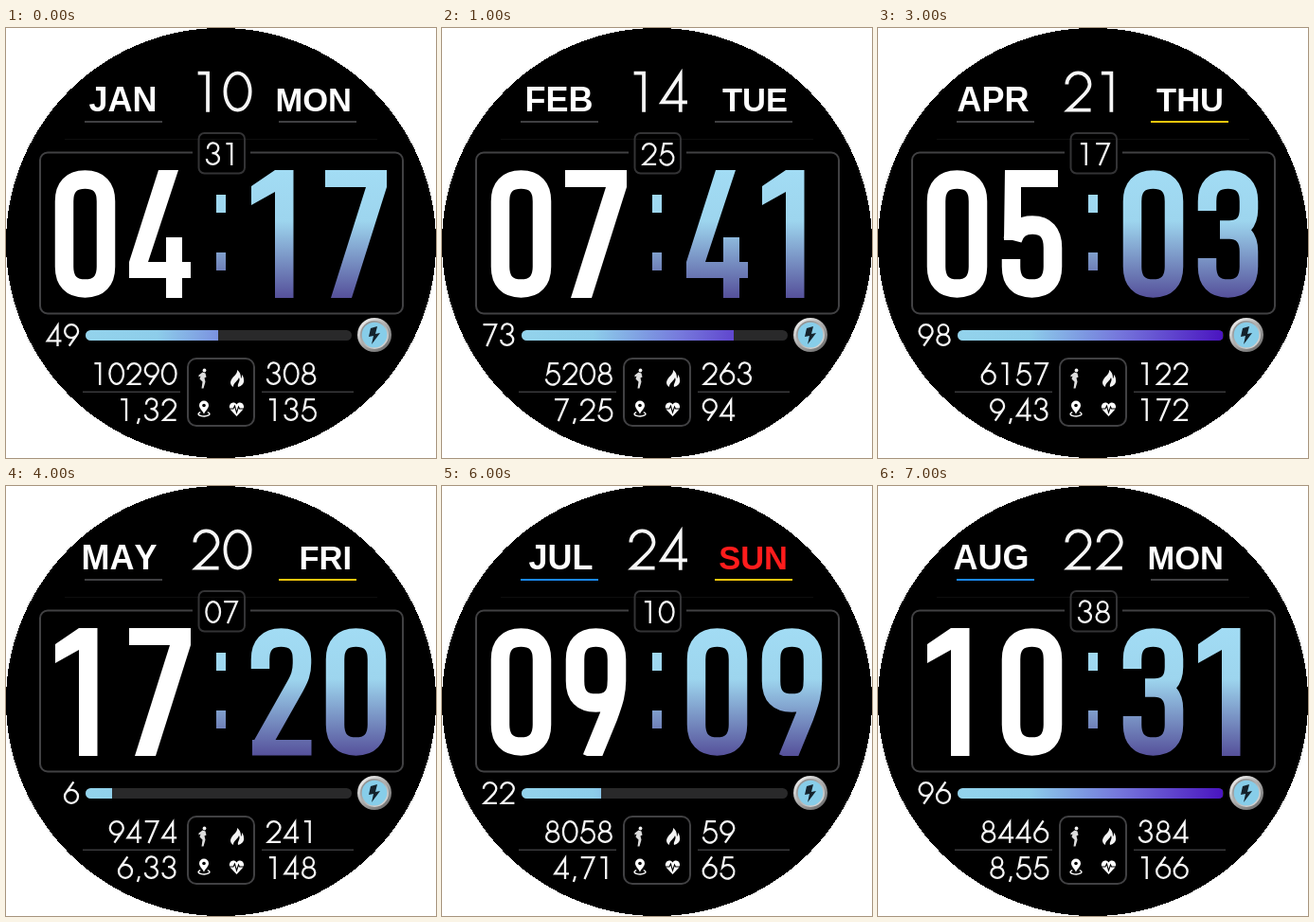
Write an HTML page with a canvas that moves like this. It is 454 by 454 pixels and loops after 8 s.

```html
<!DOCTYPE html>
<html>
<head>
<meta charset="utf-8">
<style>
  html, body { margin: 0; width: 100%; height: 100%; overflow: hidden; background: #fff; }
  canvas { display: block; }
</style>
</head>
<body>
<canvas id="face" width="454" height="454"></canvas>
<script>
const ctx = document.getElementById('face').getContext('2d');

// month, day, weekday, seconds, hours, minutes, battery, steps, distance, calories, pulse, month bar, weekday bar
const GRAY = '#404042', YELLOW = '#f5c60c', BLUE = '#1a88f0';
const states = [
  ['JAN', '10', 'MON', '31', '04', '17', 49, '10290', '1,32', '308', '135', GRAY, GRAY],
  ['FEB', '14', 'TUE', '25', '07', '41', 73, '5208', '7,25', '263', '94', GRAY, GRAY],
  ['MAR', '2', 'WED', '36', '14', '22', 51, '1966', '9,46', '182', '86', GRAY, YELLOW],
  ['APR', '21', 'THU', '17', '05', '03', 98, '6157', '9,43', '122', '172', GRAY, YELLOW],
  ['MAY', '20', 'FRI', '07', '17', '20', 6, '9474', '6,33', '241', '148', GRAY, YELLOW],
  ['JUN', '18', 'SAT', '42', '05', '40', 27, '7310', '5,28', '176', '102', GRAY, GRAY],
  ['JUL', '24', 'SUN', '10', '09', '09', 22, '8058', '4,71', '59', '65', BLUE, YELLOW],
  ['AUG', '22', 'MON', '38', '10', '31', 96, '8446', '8,55', '384', '166', BLUE, GRAY]
];

// Thin digits: centre lines in a cell 18.5 wide and 24 high.
const CELL = 18.5, COMMA = 9.2;
const thin = {
  0: 'M1.9 12A7.3 10.8 0 0 1 16.5 12A7.3 10.8 0 0 1 1.9 12Z',
  1: 'M4.4 1.2H10.2V24',
  2: 'M2.6 7.8A6.7 6.6 0 0 1 16 7.6C16 11.5 12 14.5 3.4 22.8H16.6',
  3: 'M3.6 6.6A5.6 5.4 0 1 1 9.2 11.2H8M9.2 11.2A6.5 5.8 0 1 1 2.4 17',
  4: 'M13.2 24V2L2.4 18.3H17.2',
  5: 'M15.6 1.2H6.2L4.2 11.4A7.1 7.2 0 1 1 2.3 17.4',
  6: 'M11.6 .4L3.5 12M2.2 15.8A7 7 0 0 1 16.2 15.8A7 7 0 0 1 2.2 15.8Z',
  7: 'M2.2 1.2H15.8L6 24',
  8: 'M4 6.4A5.2 5.2 0 0 1 14.4 6.4A5.2 5.2 0 0 1 4 6.4ZM2.6 17.2A6.6 5.6 0 0 1 15.8 17.2A6.6 5.6 0 0 1 2.6 17.2Z',
  9: 'M6.9 23.6L15 12M2.3 8.2A7 7 0 0 1 16.3 8.2A7 7 0 0 1 2.3 8.2Z',
  ',': 'M5.4 21L3.6 27'
};

// Heavy digits in a cell 65 wide and 135 high: [stroked path, filled path].
const TOP = 'V33C10.5 18 18 10 32.5 10S54.5 18 54.5 33';
const END = 'V102C54.5 117 47 125 32.5 125S10.5 117 10.5 102';
const heavy = {
  0: ['M10.5 102' + TOP + END + 'Z', ''],
  1: ['', 'M26 0H45.5V135H26V23L1 37V17Z'],
  2: ['M10.5 43' + TOP + 'V37C54.5 47 52 53 47 62L12 124', 'M2 118H64.5V134.5H2Z'],
  3: ['M10.5 43' + TOP + 'V41C54.5 56 47 63 34 63H24M34 63C47 63 54.5 71 54.5 86' + END + 'V93', ''],
  4: ['', 'M31 0H52L20 97H39V71H56V97H65V114H56V135H39V114H0V97Z'],
  5: ['M12 74C15 63 22 58 33 58C47 58 54.5 66 54.5 82' + END + 'V94', 'M4 0H60V18H21V74H3Z'],
  7: ['', 'M0 0H65V18L28 135H6L43 18H0Z'],
  9: ['M10.5 56' + TOP + 'V56C54.5 72 47 79 32.5 79S10.5 72 10.5 56ZM54.5 54C54.5 72 50 81 46 93L28 137', '']
};

function compile(glyphs, make) {
  for (const key in glyphs) glyphs[key] = make(glyphs[key]);
}
compile(thin, d => new Path2D(d));
compile(heavy, pair => pair.map(d => new Path2D(d)));

function gradient(x0, y0, x1, y1, ...stops) {
  const g = ctx.createLinearGradient(x0, y0, x1, y1);
  stops.forEach(([at, color]) => g.addColorStop(at, color));
  return g;
}

const advance = ch => ch === ',' ? COMMA : CELL;

function drawThin(text, x, top, align = 0, scale = 1, width = 2.3) {
  const total = [...text].reduce((sum, ch) => sum + advance(ch), 0);
  ctx.save();
  ctx.translate(x - total * scale * align, top);
  ctx.scale(scale, scale);
  ctx.strokeStyle = '#f6f6f6';
  ctx.lineWidth = width;
  for (const ch of text) {
    ctx.stroke(thin[ch]);
    ctx.translate(advance(ch), 0);
  }
  ctx.restore();
}

function drawHeavy(text, x, paint) {
  [...text].forEach((ch, i) => {
    ctx.save();
    ctx.translate(x + i * 79, 150);
    ctx.beginPath();
    ctx.rect(-1, 0, 68, 135);
    ctx.clip();
    ctx.fillStyle = ctx.strokeStyle = paint;
    ctx.lineWidth = 19.5;
    ctx.stroke(heavy[ch][0]);
    ctx.fill(heavy[ch][1]);
    ctx.restore();
  });
}

function rect(x, y, w, h, color) {
  ctx.fillStyle = color;
  ctx.fillRect(x, y, w, h);
}

function frame(x, y, w, h, r, color) {
  ctx.beginPath();
  ctx.roundRect(x, y, w, h, r);
  ctx.strokeStyle = color;
  ctx.lineWidth = 2;
  ctx.stroke();
}

function disc(x, y, r, paint) {
  ctx.beginPath();
  ctx.arc(x, y, r, 0, Math.PI * 2);
  ctx.fillStyle = paint;
  ctx.fill();
}

// Row by row, so the rim stays hard-edged.
function drawDial(r) {
  for (let y = 0; y < 2 * r; y++) {
    const half = Math.round(Math.sqrt(r * r - (y + .5 - r) ** 2));
    rect(r - half, y, 2 * half, 1, '#000');
  }
}

function shape(d, x, y, color) {
  ctx.save();
  ctx.translate(x, y);
  ctx.fillStyle = color;
  ctx.fill(new Path2D(d));
  ctx.restore();
}

function label(text, right, size, color) {
  ctx.font = `bold ${size}px "Liberation Sans", Arial, sans-serif`;
  ctx.fontKerning = 'none';
  ctx.textAlign = 'right';
  ctx.fillStyle = color;
  ctx.fillText(text, right, 88);
}

function drawIcons() {
  disc(209.5, 361.5, 1.9, '#eee');
  shape('M-1 -6L2 -5L3 -1L1 0L2 4L0 11H-2L-1 4L-4 1L-3 -2L-5 -1L-5 -3Z', 208.5, 369.5, '#ddd');
  shape('M0 -9C1 -4 -6 -2 -7 4C-7 6 -6 8 -4 9C-4 4 1 3 2 -1C4 3 0 5 1 9C5 8 8 5 7 1C7 -1 6 -3 5 -4C5 -2 5 -1 4 0C4 -4 3 -7 0 -9Z', 244, 370, '#f4f4f4');
  ctx.strokeStyle = '#fff';
  ctx.lineWidth = 1.4;
  ctx.beginPath();
  ctx.ellipse(209, 407.5, 6, 2.4, 0, -.9, Math.PI + .9);
  ctx.stroke();
  shape('M0 13C-2 9 -5 7 -5 4A5 5 0 0 1 5 4C5 7 2 9 0 13Z', 209, 394.5, '#fff');
  disc(209, 398.5, 1.8, '#000');
  shape('M0 8L-6.5 1C-9 -2 -7 -6.5 -3.5 -6.5C-2 -6.5 -1 -6 0 -4.5C1 -6 2 -6.5 3.5 -6.5C7 -6.5 9 -2 6.5 1Z', 243.5, 402, '#fff');
  ctx.strokeStyle = '#000';
  ctx.lineWidth = 1.1;
  ctx.stroke(new Path2D('M235 402H240L241.5 399L243.5 406L245.5 400L246.5 402H252'));
}

function drawBattery(level) {
  ctx.save();
  ctx.beginPath();
  ctx.roundRect(84, 319, 281, 11, 5.5);
  ctx.clip();
  rect(84, 319, 281, 11, '#29292a');
  rect(84, 319, 28 * Math.ceil(level / 10), 11, gradient(84, 0, 364, 0,
    [0, '#93d3ec'], [.27, '#8dcdea'], [.5, '#7b92e0'], [.6, '#7679dc'], [1, '#4a14c0']));
  ctx.restore();
  drawThin(String(level), 78.3, 312, 1);
  disc(389, 324, 18, gradient(376, 308, 402, 340, [0, '#f2f2f2'], [.5, '#a9a9a9'], [1, '#6c6c6c']));
  disc(389, 324, 15, gradient(376, 308, 402, 340, [0, '#858585'], [1, '#e0e0e0']));
  disc(389, 324, 13.3, '#87cde9');
  shape('M3 -9L-4 -7L-6 2L-1 1L-3 10L6 -2L1 -1Z', 389, 324, '#14222c');
}

function draw(state) {
  const [month, day, weekday, seconds, hours, minutes, battery,
    steps, distance, calories, pulse, monthBar, weekdayBar] = state;
  rect(0, 0, 454, 454, '#fff');
  drawDial(227);

  label(month, 159.5, 36, '#fff');
  label(weekday, 365, 34.5, weekday === 'SUN' || weekday === 'SAT' ? '#ff1c1c' : '#fff');
  drawThin(day, 228, 45.5, .5, 1.8, 2.1);
  rect(83, 98, 82, 2, monthBar);
  rect(288, 98, 82, 2, weekdayBar);
  rect(62, 117, 330, 1, '#0e0e0e');

  frame(36, 131.5, 383, 170, 8, '#414143');
  rect(197, 129, 61, 5, '#000');
  frame(203.5, 111, 48.5, 42.5, 6, '#333335');
  drawThin(seconds, 228, 121, .5);

  drawHeavy(hours, 51, '#fff');
  const stops = [[0, '#a2dcf4'], [.4, '#9dd5ee'], [1, '#55509a']];
  drawHeavy(minutes, 258, gradient(0, 0, 0, 135, ...stops));
  const colon = gradient(0, 150, 0, 285, ...stops);
  rect(222, 176, 10, 19, colon);
  rect(222, 237, 10, 19, colon);

  drawBattery(battery);

  rect(81, 383.5, 103, 1.5, '#3a3a3c');
  rect(270, 383.5, 97, 1.5, '#3a3a3c');
  frame(192, 349, 70, 71, 9, '#414143');
  drawIcons();
  drawThin(steps, 181.5, 353, 1);
  drawThin(distance, 181.5, 391, 1);
  drawThin(calories, 273.5, 353);
  drawThin(pulse, 273.5, 391);
}

const start = performance.now();
function tick(now) {
  const elapsed = Math.max(0, now - start);
  draw(states[Math.floor(elapsed / 1000) % states.length]);
  requestAnimationFrame(tick);
}
draw(states[0]);
requestAnimationFrame(tick);
</script>
</body>
</html>
```
